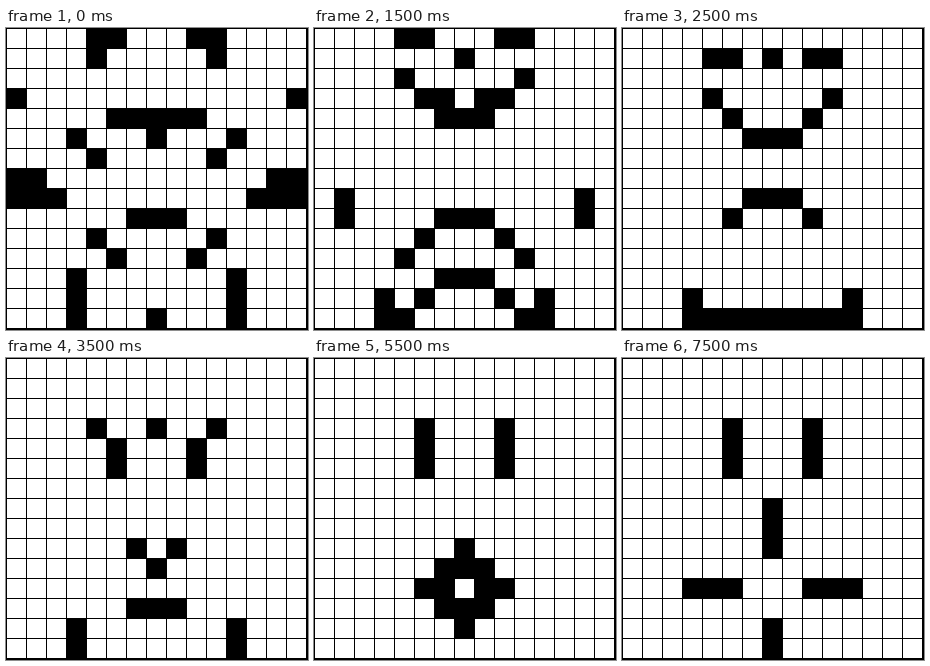
An HTML page with a canvas that plays this animation: 302 by 302 pixels, repeating every 8 s.

```html
<!DOCTYPE html>
<html lang="en">
<head>
<meta charset="utf-8">
<title>Game of Life</title>
<style>
html, body { margin: 0; width: 100%; height: 100%; overflow: hidden; background: #000; }
canvas { display: block; }
</style>
</head>
<body>
<canvas id="board" width="302" height="302"></canvas>
<script>
const SIZE = 15, PITCH = 20, STEP = 500, COUNT = 16;

// Left half with the middle column; the right half mirrors it.
const seed = [
  '....##..',
  '....#...',
  '........',
  '#.......',
  '.....###',
  '...#...#',
  '....#...',
  '##......',
  '###.....',
  '......##',
  '....#...',
  '.....#..',
  '...#....',
  '...#....',
  '...#...#'
];

const start = seed.map(row =>
  Array.from({ length: SIZE }, (_, x) => row[Math.min(x, SIZE - 1 - x)] === '#'));

function neighbours(grid, x, y) {
  let sum = 0;
  for (let dy = -1; dy <= 1; dy++)
    for (let dx = -1; dx <= 1; dx++)
      if ((dx || dy) && grid[y + dy]?.[x + dx]) sum++;
  return sum;
}

// Everything beyond the border counts as dead.
function evolve(grid) {
  return grid.map((row, y) => row.map((alive, x) => {
    const n = neighbours(grid, x, y);
    return n === 3 || (alive && n === 2);
  }));
}

const generations = [start];
while (generations.length < COUNT) generations.push(evolve(generations.at(-1)));

const ctx = document.getElementById('board').getContext('2d');

function draw(grid) {
  ctx.fillStyle = '#000';
  ctx.fillRect(0, 0, 302, 302);
  ctx.fillStyle = '#fff';
  grid.forEach((row, y) => row.forEach((alive, x) => {
    if (!alive) ctx.fillRect(x * PITCH + 1, y * PITCH + 1, PITCH - 1, PITCH - 1);
  }));
}

let shown = 0;
draw(start);
const origin = performance.now();

function tick() {
  const elapsed = Math.max(0, performance.now() - origin);
  const index = Math.floor(elapsed / STEP) % COUNT;
  if (index !== shown) draw(generations[shown = index]);
  requestAnimationFrame(tick);
}
requestAnimationFrame(tick);
</script>
</body>
</html>
```
